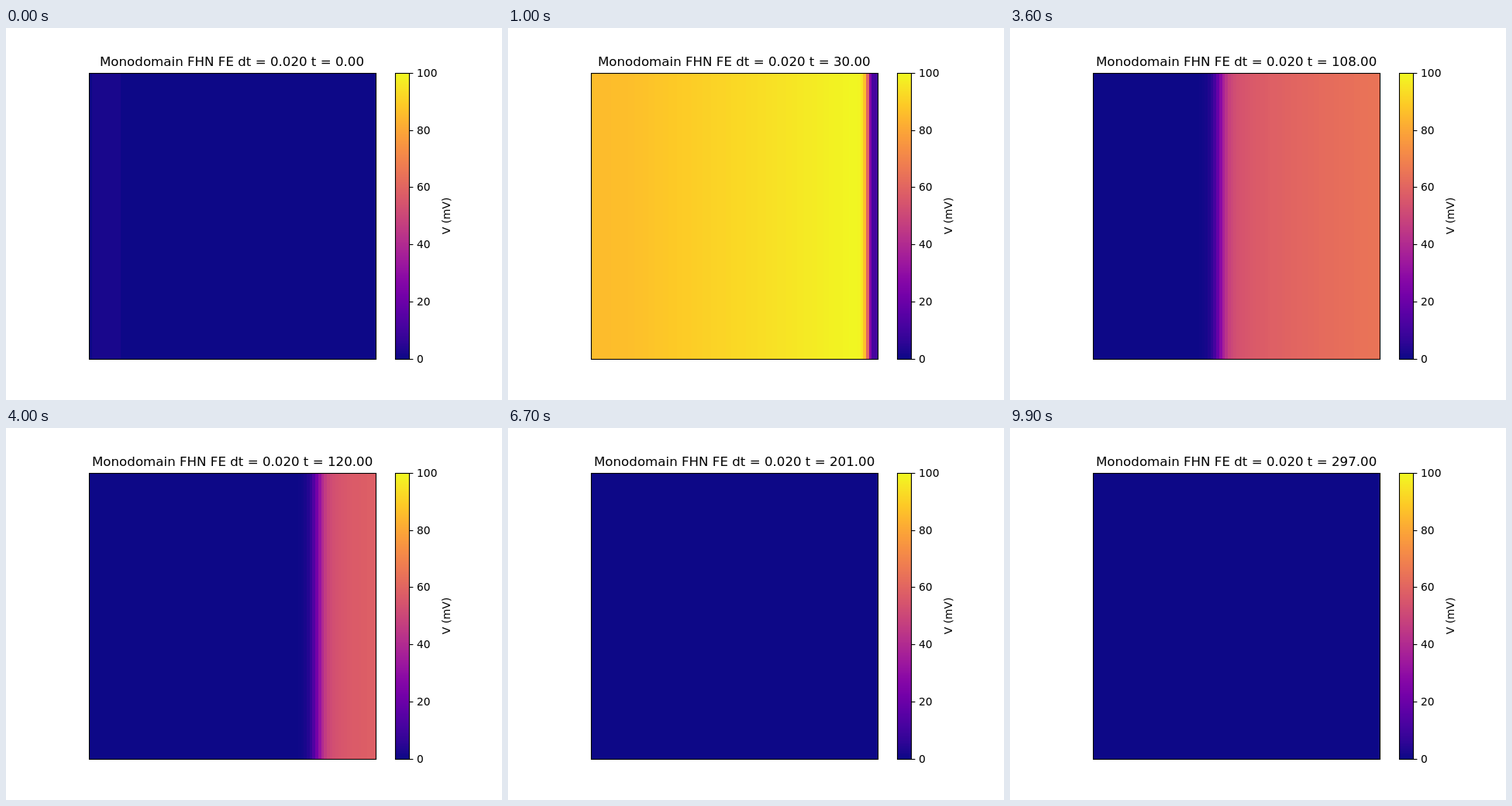
An HTML page with a canvas that plays this animation: 640 by 480 pixels, repeating every 10000 ms.

```html
<!DOCTYPE html>
<html lang="en">
<head>
<meta charset="utf-8">
<title>Monodomain FHN</title>
<style>
html, body { margin: 0; width: 100%; height: 100%; overflow: hidden; background: #fff; }
canvas { display: block; width: 640px; height: 480px; }
</style>
</head>
<body>
<canvas id="stage" width="640" height="480"></canvas>
<script>
const ctx = document.getElementById('stage').getContext('2d');
const FRAMES = 100, HOLD = 100, DT = 0.02, STEPS = 150;
const CELLS = 100;
const plot = { x: 107.2, y: 57.6, size: 369.6 };
const bar = { x: 502, right: 520 };

// Plasma colour map, evenly spaced stops
const stops = ('0d0887 2e0595 46039f 5d01a6 7401a8 8808a6 9c179e ad2793 bd3786 cb4778 ' +
  'd8576b e3685f ed7953 f58b47 fa9e3b fdb330 fdca26 f8e125 f0f921')
  .split(' ').map(h => [0, 2, 4].map(i => parseInt(h.slice(i, i + 2), 16)));

const palette = Array.from({ length: 256 }, (_, i) => {
  const p = i / 255 * (stops.length - 1);
  const k = Math.min(Math.floor(p), stops.length - 2);
  const mix = stops[k].map((c, j) => Math.round(c + (stops[k + 1][j] - c) * (p - k)));
  return `rgb(${mix})`;
});

function colour(level) {
  return palette[Math.max(0, Math.min(255, Math.floor(level * 256)))];
}

// FitzHugh-Nagumo cable, forward Euler, no-flux ends; v in mV
function simulate() {
  const G = 1.5, vth = 13, vp = 100, eta1 = 4.4, eta2 = 0.012;
  const diff = 3, stim = 100, stimEnd = 1;
  let v = new Float64Array(CELLS), next = new Float64Array(CELLS);
  const w = new Float64Array(CELLS);
  const shots = [];
  for (let n = 0; n <= (FRAMES - 1) * STEPS; n++) {
    v[0] = v[1];
    v[CELLS - 1] = v[CELLS - 2];
    next[0] = v[0];
    next[CELLS - 1] = v[CELLS - 1];
    for (let i = 1; i < CELLS - 1; i++) {
      const u = v[i];
      const ion = G * u * (1 - u / vth) * (1 - u / vp) + eta1 * u * w[i];
      const push = i <= 10 && n * DT < stimEnd ? stim : 0;
      next[i] = u + DT * (diff * (v[i - 1] - 2 * u + v[i + 1]) - ion + push);
      w[i] += DT * eta2 * (u / vp - w[i]);
    }
    [v, next] = [next, v];
    if (n % STEPS === 0) shots.push(Array.from(v, u => u / vp));
  }
  return shots;
}

const shots = simulate();

function text(str, x, y, size) {
  ctx.font = `${size}px "DejaVu Sans", sans-serif`;
  ctx.fillText(str, x, y);
}

function drawField(levels) {
  const edge = i => Math.round(plot.x + i * plot.size / CELLS);
  levels.forEach((level, i) => {
    ctx.fillStyle = colour(level);
    ctx.fillRect(edge(i), 58, edge(i + 1) - edge(i), 369);
  });
  ctx.strokeRect(107.5, 58.5, 370, 369);
}

function drawBar() {
  const bottom = plot.y + plot.size;
  for (let y = 58; y < 428; y++) {
    ctx.fillStyle = colour((bottom - y - 0.5) / plot.size);
    ctx.fillRect(bar.x, y, bar.right - bar.x, 1);
  }
  ctx.strokeRect(bar.x + 0.5, 58.5, bar.right - bar.x, 369);
  ctx.fillStyle = '#000';
  for (let k = 0; k <= 5; k++) {
    const y = Math.round(bottom - k * plot.size / 5) + 0.5;
    ctx.beginPath();
    ctx.moveTo(bar.right + 0.5, y);
    ctx.lineTo(bar.right + 5.4, y);
    ctx.stroke();
    text(String(k * 20), 530, Math.floor(y) + 5, 13.889);
  }
  ctx.save();
  ctx.translate(573, 242.4);
  ctx.rotate(-Math.PI / 2);
  ctx.textAlign = 'center';
  text('V (mV)', 0, 0, 13.889);
  ctx.restore();
}

function drawTitle(frame) {
  const str = `Monodomain FHN FE dt = ${DT.toFixed(3)} t = ${(frame * STEPS * DT).toFixed(2)}`;
  ctx.font = '16.667px "DejaVu Sans", sans-serif';
  const left = Math.round(plot.x + plot.size / 2 - ctx.measureText(str).width / 2);
  text(str, left, 49, 16.667);
}

function draw(frame) {
  ctx.fillStyle = '#fff';
  ctx.fillRect(0, 0, 640, 480);
  ctx.strokeStyle = '#000';
  ctx.lineWidth = 1.11;
  drawField(shots[frame]);
  drawBar();
  drawTitle(frame);
}

const start = performance.now();
let shown = -1;

function tick() {
  const frame = Math.floor((performance.now() - start) / HOLD) % FRAMES;
  if (frame !== shown) draw(shown = frame);
  requestAnimationFrame(tick);
}

tick();
</script>
</body>
</html>
```
